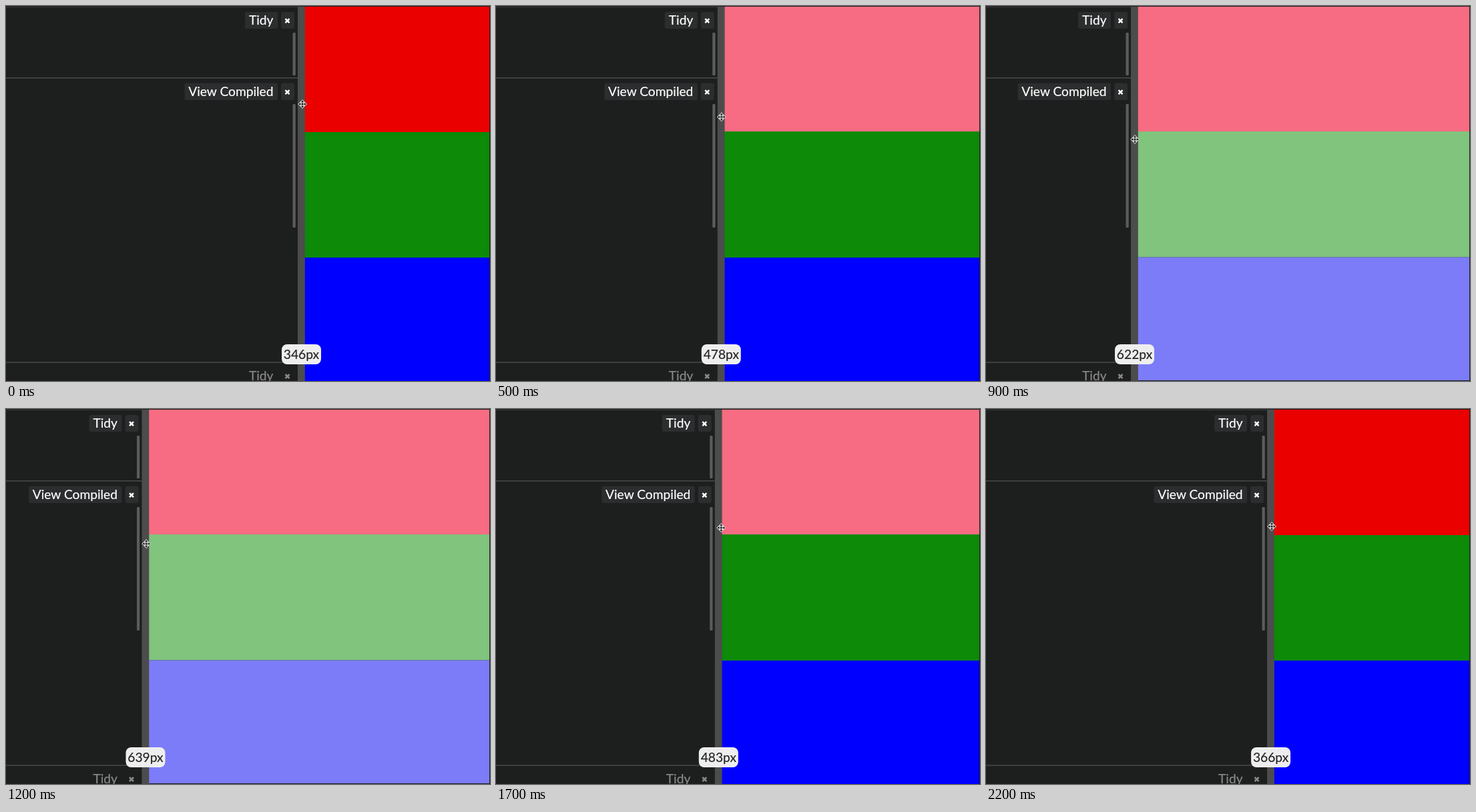
These frames come from a looping animation (725x562 px, 2400 ms). An HTML page:

```html
<!DOCTYPE html>
<html lang="en">
<head>
<meta charset="utf-8">
<title>Resizable preview pane</title>
<style>
  html, body { margin: 0; width: 100%; height: 100%; overflow: hidden; background: #1d1f1e; }
  svg { display: block; width: 725px; height: 562px; }
  text { font: 19.2px Lato, sans-serif; }
  .button { fill: #2c2d2e; }
  .label { fill: #fff; stroke: #fff; stroke-width: .2; text-anchor: end; }
  .cross { stroke: #fff; stroke-width: 2.5; }
  .scroll { fill: #5c5c5c; }
  .dim { opacity: .47; }
</style>
</head>
<body>
<svg viewBox="0 0 725 562">
  <defs><path id="cross" d="M-3 -3L3 3M3 -3L-3 3"/></defs>
  <rect width="725" height="562" fill="#1d1f1e"/>
  <rect id="top"/>
  <rect id="middle"/>
  <rect id="bottom"/>
  <g id="rules">
    <rect y="1" height="1" fill="#383939"/>
    <rect y="107" height="1.5" fill="#484949"/>
    <rect y="533.3" height="1.5" fill="#484949"/>
  </g>
  <!-- x = 0 is the left edge of the divider -->
  <g id="pane">
    <rect class="button" x="-79" y="9" width="49" height="25" rx="3"/>
    <rect class="button" x="-25" y="9" width="20" height="25" rx="3"/>
    <rect class="button" x="-169.5" y="115.5" width="139.5" height="25.5" rx="3"/>
    <rect class="button" x="-25" y="115.5" width="20" height="25.5" rx="3"/>
    <text class="label" x="-36.5" y="28">Tidy</text>
    <text class="label" x="-36.5" y="135">View Compiled</text>
    <use class="cross" href="#cross" x="-15.5" y="22.2"/>
    <use class="cross" href="#cross" x="-15.5" y="129.2"/>
    <g class="dim">
      <text class="label" x="-36.5" y="561">Tidy</text>
      <use class="cross" href="#cross" x="-15.5" y="555"/>
    </g>
    <rect class="scroll" x="-7.5" y="40" width="4.2" height="64" rx="1"/>
    <rect class="scroll" x="-7.5" y="147" width="4.2" height="185" rx="1"/>
    <rect y="1" width="10.8" height="561" fill="#4c4c4c"/>
    <rect x="-24" y="507" width="59" height="30" rx="8" fill="#eeeeee"/>
    <text id="size" x="5.5" y="528.8" text-anchor="middle" fill="#222" stroke="#222" stroke-width=".15"></text>
  </g>
  <path id="cursor" fill="#222" stroke="#eee" stroke-width="1"
    d="M-6.5 0L-3 -3V-1H-1V-3H-3L0 -6.5L3 -3H1V-1H3V-3L6.5 0L3 3V1H1V3H3L0 6.5L-3 3H-1V1H-3V3Z"/>
</svg>
<script>
  const LOOP = 2400, STEP = 100, LAST = 2200;
  const el = id => document.getElementById(id);

  // Points are [time, value].
  const paneWidth = [[0, 346], [300, 415], [700, 549], [900, 622], [1200, 639],
    [1500, 600], [1700, 483], [1800, 450], [2200, 366]];
  const cursorY = [[0, 147], [300, 156], [700, 180], [900, 200], [1200, 202],
    [1500, 190], [1700, 178], [2200, 176]];
  const cursorOffset = [[0, 7], [300, 7], [700, 5], [900, 6], [1500, 7.5], [1700, 9.5], [2200, 7]];

  // Smooth curve through the points that never overshoots them.
  function curve(points, t) {
    const n = points.length - 1;
    const slope = i => (points[i + 1][1] - points[i][1]) / (points[i + 1][0] - points[i][0]);
    const tangent = i => {
      if (i === 0) return slope(0);
      if (i === n) return slope(n - 1);
      const a = slope(i - 1), b = slope(i);
      return a * b <= 0 ? 0 : 2 * a * b / (a + b);
    };
    let i = 0;
    while (i < n - 1 && t >= points[i + 1][0]) i++;
    const [t0, v0] = points[i], [t1, v1] = points[i + 1];
    const h = t1 - t0, u = (t - t0) / h, w = 1 - u;
    return v0 * w * w * (1 + 2 * u) + v1 * u * u * (3 - 2 * u)
      + h * u * w * (tangent(i) * w - tangent(i + 1) * u);
  }

  function band(id, x, from, to, fill) {
    const attrs = { x, y: from, width: 724 - x, height: to - from, fill };
    for (const name in attrs) el(id).setAttribute(name, attrs[name]);
  }

  function draw(time) {
    const t = Math.min(Math.floor(time % LOOP / STEP) * STEP, LAST);
    const width = Math.round(curve(paneWidth, t));
    const x = 437 - (width - 346) * 0.797;
    const medium = width >= 400, wide = width >= 600;
    const split = medium ? 188 : 189, split2 = wide ? 376.5 : 377;

    band('top', x + 10, 1, split, medium ? '#f76c82' : '#eb0000');
    band('middle', x + 10, split, split2, wide ? '#80c47d' : '#0c8a08');
    band('bottom', x + 10, split2, wide ? 561 : 562, wide ? '#7c7cf8' : '#0000fe');

    for (const rule of el('rules').children) rule.setAttribute('width', x);
    el('pane').setAttribute('transform', `translate(${x} 0)`);
    el('size').textContent = width + 'px';
    el('cursor').setAttribute('transform',
      `translate(${x + curve(cursorOffset, t)} ${curve(cursorY, t)})`);
  }

  const start = performance.now();
  function tick() {
    draw(performance.now() - start);
    requestAnimationFrame(tick);
  }
  tick();
</script>
</body>
</html>
```
